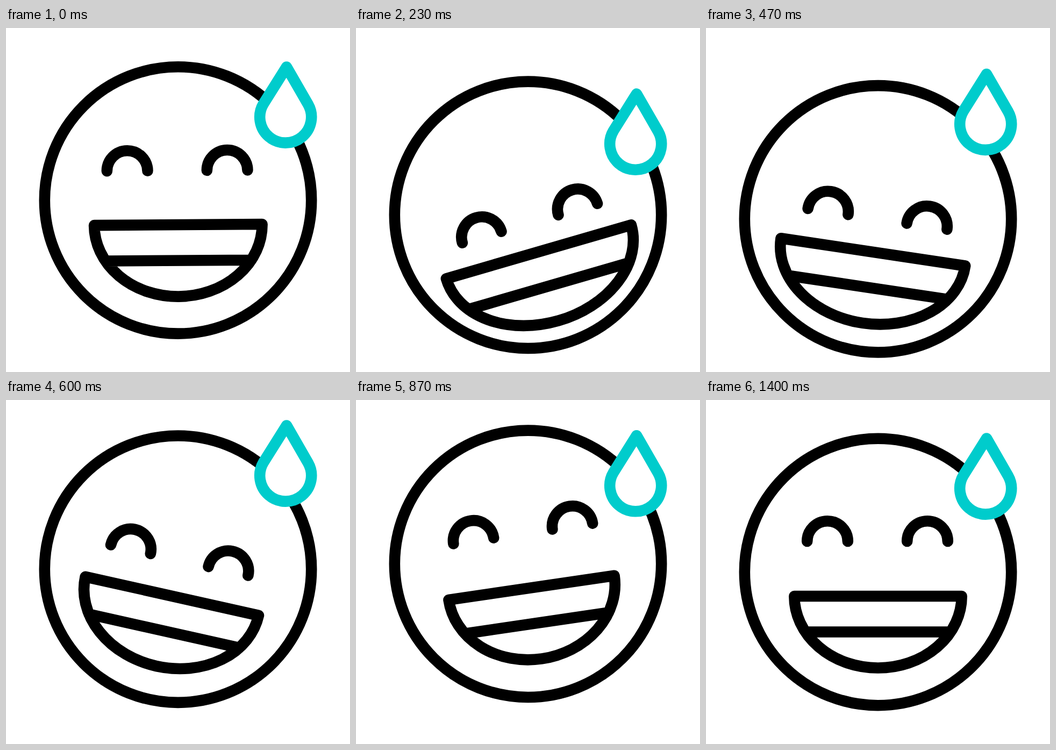
An HTML page that plays this animation: 640x640 px, repeating every 1670 ms.

```html
<!DOCTYPE html>
<html lang="en">
<head>
<meta charset="utf-8">
<title>Nervous laugh</title>
<style>
  html, body { margin: 0; width: 100%; height: 100%; overflow: hidden; background: #fff; }
  svg { display: block; width: 100%; height: 100%; }
</style>
</head>
<body>
<svg viewBox="0 0 640 640" fill="none" stroke="#000" stroke-width="20.6" stroke-linecap="round" stroke-linejoin="round">
  <g id="head">
    <circle r="248.2"/>
    <g id="features">
      <path id="eyes" d="M-131.8-57a37.8 37.8 0 0 1 75.6 0m110.4 0a37.8 37.8 0 0 1 75.6 0"/>
      <path id="mouth"/>
    </g>
  </g>
  <path id="drop" d="M522 71.5L479 140A48 48 0 1 0 562 141Z" fill="#fff" stroke="#0cc"/>
</svg>
<script>
const LOOP = 1670, STEP = 100 / 3, START = -.8, END = 42;
const $ = id => document.getElementById(id);
const [head, features, eyes, mouth, drop] = ['head', 'features', 'eyes', 'mouth', 'drop'].map($);

const progress = (t, from, to) => Math.min(1, Math.max(0, (t - from) / (to - from)));

function ramp(t, from, to) {
  const u = progress(t, from, to);
  return u * u * (3 - 2 * u);
}

// Eases from 0 up to 1 at the peak and back to 0
const hump = (t, from, peak, to) => ramp(t, from, peak) - ramp(t, peak, to);

// Swings to alternating sides, each swing smaller than the last
function swing(t, size) {
  const beats = [START, 8, 16.3, 26.3, 33, END];
  let angle = 0;
  for (let k = 0; k < 4; k++) {
    const side = k % 2 ? 1 : -1, decay = Math.cos(k * Math.PI / 8) ** 2;
    angle += side * size * decay * hump(t, ...beats.slice(k, k + 3));
  }
  return angle;
}

// Two long slides down with a fading wobble between them
function slide(t) {
  const first = 9.5, second = 33, wobbleStart = 18, beat = 4.5;
  const wobbleEnd = wobbleStart + 2 * beat;
  let y = 60 * (hump(t, START, first, wobbleStart) + hump(t, wobbleEnd, second, END));
  for (let k = 0; k < 3; k++) {
    const peak = wobbleStart + k * beat;
    const from = k ? peak - beat : first, to = k < 2 ? peak + beat : second;
    y -= 24 * (-.58) ** k * hump(t, from, peak, to);
  }
  return y;
}

function draw(ms) {
  const t = Math.floor((ms % LOOP + 5) / STEP);
  const headY = 42.5 * hump(t, START, 12.1, 21.9) - 31 * hump(t, 12.1, 21.9, 30);
  const eyesY = 73.5 * ramp(t, START, 7.5) * (1 - progress(t, 8, 25.6) ** 1.4);
  const top = 45 + 27.3 * hump(t, START, 8, 22.6);
  const rx = 155.7 + 24.3 * hump(t, START, 8, 25.4);
  const teeth = rx * .867;

  head.setAttribute('transform', `translate(320 ${320 + headY})`);
  features.setAttribute('transform', `rotate(${swing(t, 16.8)})`);
  eyes.setAttribute('transform', `translate(0 ${eyesY})`);
  mouth.setAttribute('d',
    `M${-rx} ${top}A${rx} 133.5 0 0 0 ${rx} ${top}ZM${-teeth} ${top + 66.5}H${teeth}`);
  drop.setAttribute('transform', `translate(0 ${slide(t)})`);
}

const start = performance.now();
function tick() {
  draw(performance.now() - start);
  requestAnimationFrame(tick);
}
tick();
</script>
</body>
</html>
```
